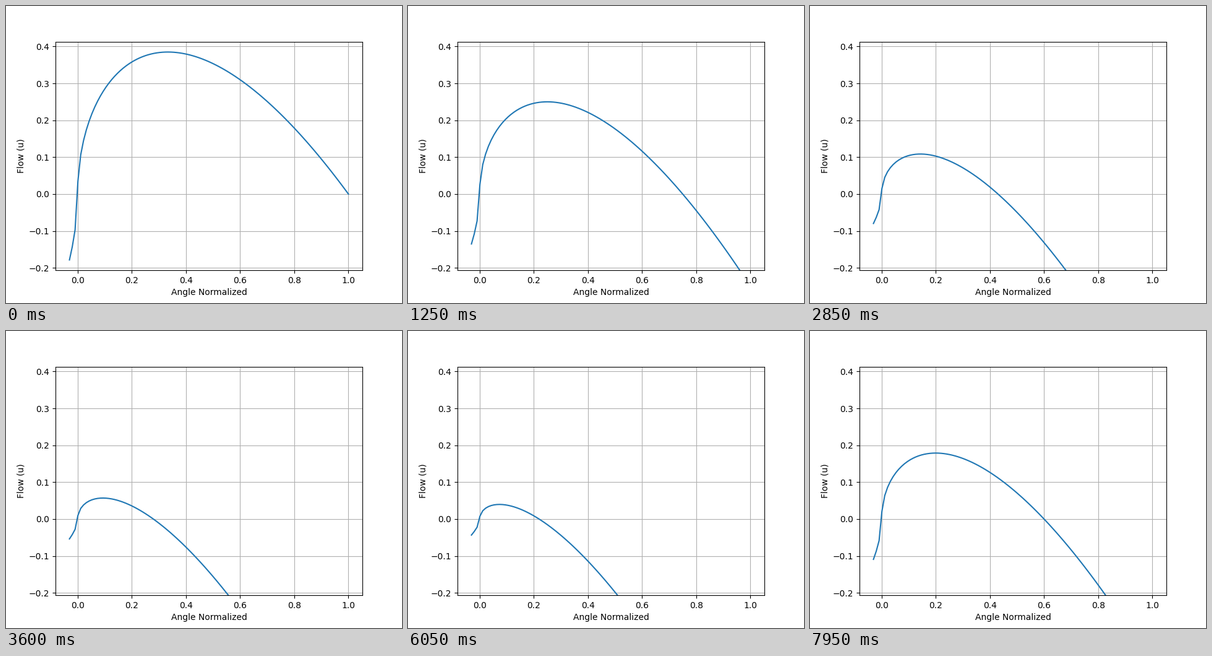
Write a matplotlib script that moves like this. It is 640 px wide and 480 px high and loops after 8000 ms.

```python
import numpy as np
import matplotlib.pyplot as plt
from matplotlib.animation import FuncAnimation

FRAMES = 160
INTERVAL = 50  # ms

angle = np.linspace(-0.03, 1, 100)


def level(i):
    """Fall from 1 to 0.01, hold one step, then rise again."""
    return (100 - i if i < 100 else i - 99) / 100


def flow(offset):
    return np.sign(angle) * np.sqrt(np.abs(angle)) * (offset - angle)


fig, ax = plt.subplots(figsize=(6.4, 4.8), dpi=100)
line, = ax.plot(angle, flow(level(0)))
ax.set_xlabel("Angle Normalized")
ax.set_ylabel("Flow (u)")
ax.grid(True)
# Keep the limits of the first curve
ax.set_xlim(ax.get_xlim())
ax.set_ylim(ax.get_ylim())


def update(i):
    line.set_ydata(flow(level(i)))
    return line,


anim = FuncAnimation(fig, update, frames=FRAMES, interval=INTERVAL,
                     init_func=lambda: update(0), repeat=True, repeat_delay=0)
plt.show()
```
